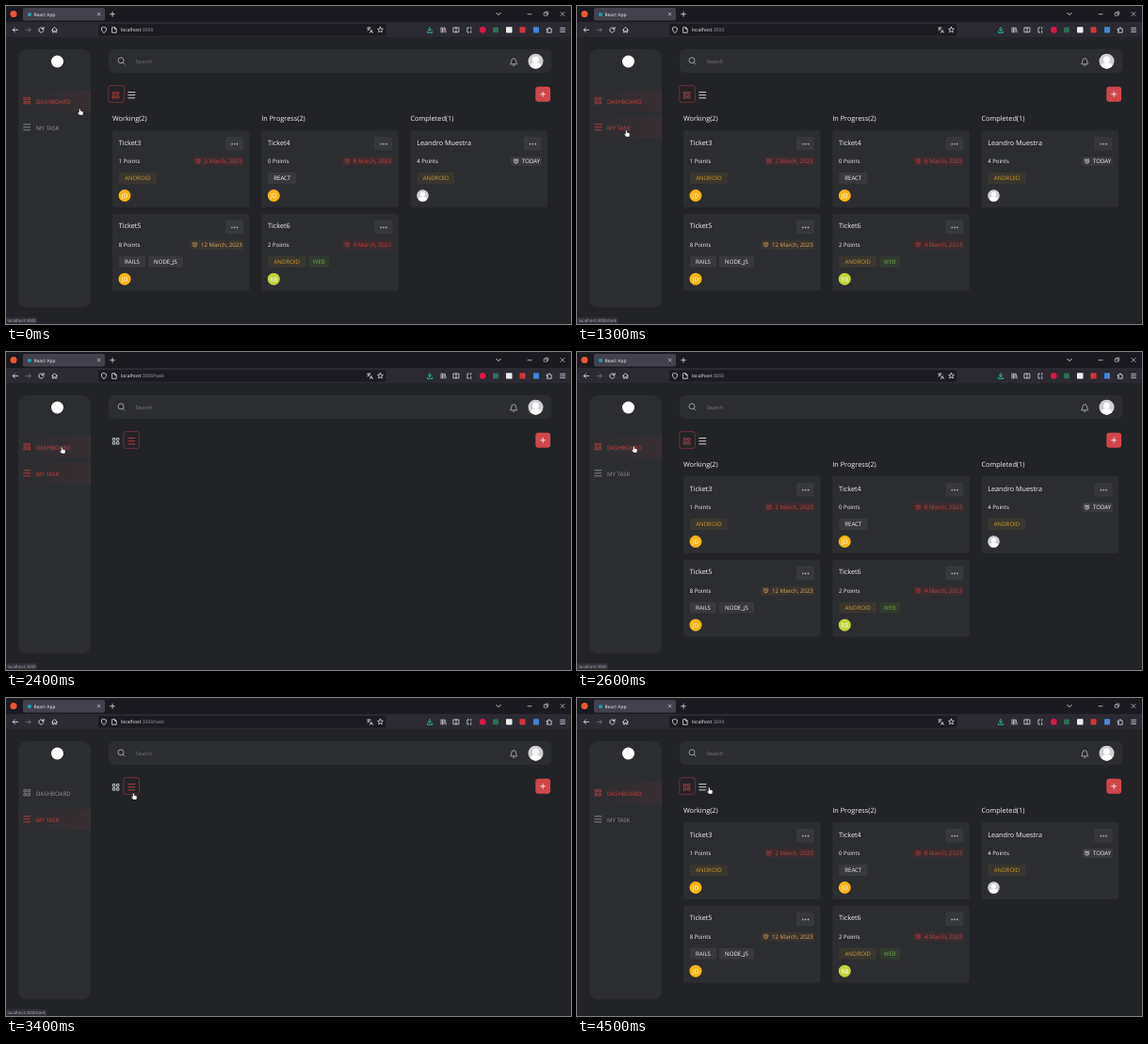
Animation, 600 px wide and 338 px high, one loop 4600 ms. Source, as an HTML page:

```html
<!DOCTYPE html>
<html lang="en">
<head>
<meta charset="utf-8">
<title>Task board</title>
<style>
  html, body { margin: 0; width: 100%; height: 100%; overflow: hidden; background: #222327; }
  svg { display: block; width: 100vw; height: 100vh; }
  text { font-family: "Open Sans", "Noto Sans", sans-serif; text-rendering: geometricPrecision; white-space: pre; }
</style>
</head>
<body>
<svg id="stage" viewBox="0 0 600 338"></svg>
<script>
const LOOP = 4600, STEP = 100;
const RED = '#c5423f', WHITE = '#f2f2f4', GREY = '#94959a', INK = '#dcdce0';

// Drawing helpers
const rect = (x, y, w, h, fill, r = 0, more = '') =>
  `<rect x="${x}" y="${y}" width="${w}" height="${h}" rx="${r}" fill="${fill}" ${more}/>`;
const circle = (x, y, r, fill) => `<circle cx="${x}" cy="${y}" r="${r}" fill="${fill}"/>`;
const line = (d, color = INK, w = 0.8) =>
  `<path d="${d}" fill="none" stroke="${color}" stroke-width="${w}" stroke-linecap="round" stroke-linejoin="round"/>`;
const text = (x, y, size, fill, value, more = '') =>
  `<text x="${x}" y="${y}" font-size="${size}" fill="${fill}" ${more}>${value}</text>`;
const group = (id, body) => `<g id="${id}">${body}</g>`;

const gridIcon = (x, y) => [[0, 0], [4.1, 0], [0, 4.1], [4.1, 4.1]].map(([dx, dy]) =>
  rect(x + dx, y + dy, 2.5, 2.5, 'none', 0.2, 'stroke="currentColor" stroke-width="0.8"')).join('');
const listIcon = (x, y, gap) =>
  line([0, 1, 2].map(i => `M${x} ${y + i * gap}h7`).join(''), 'currentColor', 0.85);

const person = (x, y, r) => circle(x, y, r, '#cfd0d2') +
  circle(x, y - r * 0.22, r * 0.42, '#fff') +
  `<path d="M${x - r * 0.7} ${y + r * 0.7}q0 ${-r * 0.5} ${r * 0.7} ${-r * 0.5}t${r * 0.7} ${r * 0.5}q${-r * 0.7} ${r * 0.6} ${-r * 1.4} 0" fill="#fff"/>`;

function browser() {
  return rect(0, 0, 600, 17, '#1b1a21') + rect(0, 17, 600, 16, '#2b2a33') +
    circle(8, 8.5, 3.5, '#ef5634') +
    rect(18, 2, 87, 13.5, '#42414d', 2) + circle(25, 9, 2.1, '#229caf') +
    text(29.5, 10.8, 4.9, WHITE, 'React App') +
    line('M97.2 7.2l2.8 2.8m0-2.8l-2.8 2.8', INK, 0.7) +
    line('M110.7 8.7h4.8m-2.4-2.4v4.8') +
    line('M520.7 7.3l2.3 2.3l2.3-2.3', INK, 0.9) +
    line('M554 8.7h4', INK, 0.7) +
    line('M571.6 7.2h3v3h-3zM572.8 7.2v-1.1h3v3h-1.1', INK, 0.6) +
    line('M589 6.5l4 4m0-4l-4 4', INK, 0.7) +
    line('M12.5 25.4h-5.3m2.2-2.2l-2.2 2.2l2.2 2.2', INK, 0.9) +
    line('M21 25.4h5.3m-2.2-2.2l2.2 2.2l-2.2 2.2', '#74737c') +
    line('M39.6 24a2.6 2.6 0 1 0 .4 2M40.1 22.5v2h-2', INK, 0.9) +
    line('M48.6 25.4l2.9-2.7l2.9 2.7m-5 -.4v3h1.5v-1.7h1.3v1.7h1.5v-3') +
    rect(98, 19, 305.5, 12.8, '#1c1b22', 2) +
    line('M104 22.5l2.5 1c0 2.5-.6 4-2.5 5c-1.9-1-2.5-2.5-2.5-5z') +
    line('M113 22.7h2.6l1.6 1.6v4h-4.2zM115.5 22.8v1.6h1.5') +
    `<text x="122" y="27.3" font-size="5.1" fill="#9c9ca4"><tspan fill="${WHITE}">localhost</tspan><tspan id="path"></tspan></text>` +
    line('M383.5 23.2h3.6m-1.8-.8v.8m1.2 0q-.7 2.3-2.7 2.8m.3-2q.8 1.5 2 1.8M386.6 28.4l1.4-3.2l1.4 3.2m-2.3-.9h1.8', INK, 0.65) +
    line('M397.5 22.3l.9 1.9l2 .2l-1.5 1.4l.4 2.1l-1.8-1.1l-1.8 1.1l.4-2.1l-1.5-1.4l2-.2z') +
    line('M450 22.5v3.8m-1.7-1.6l1.7 1.7l1.7-1.7m-4.2 2.4v1.2h5v-1.2', '#2bc3a5', 0.9) +
    line('M462 23v5m1.5-5v5m1.5-5v5m1-4.8l1.3 4.8') +
    line('M475.3 23h5.6v4.8h-5.6zM478 23v4.8') +
    line('M491.5 23h-1.6v5h1.6M493.7 22.5v1.7m0 2v2.3') +
    circle(506.3, 25.4, 3.3, '#df1748') +
    rect(517, 22.5, 6, 5.8, '#2f6d52', 1) +
    rect(531, 22.3, 6.5, 6.2, '#eeeeef', 0.7) +
    rect(545.5, 22.3, 6, 6.2, '#d2373a', 0.7) +
    rect(560, 22.3, 6, 6.2, '#4285d8', 0.7) +
    line('M574.5 24.2h1.6v-1.2h1.5v1.2h1.6v4h-4.7v-1.4h1v-1.3h-1z') +
    line('M588.7 23.3h4.8m-4.8 2.1h4.8m-4.8 2.1h4.8');
}

function navItem(id, label, y, icon) {
  return rect(13, y - 11, 77, 22, 'url(#glow)', 0, `id="${id}Glow"`) +
    group(id, icon + text(32, y + 2.5, 6.1, 'currentColor', label));
}

const toggleBox = (id, x, w) =>
  rect(x, 84.6, w, 17.8, 'none', 2.5, `id="${id}" stroke="#8f363a" stroke-width=".7"`);

function shell() {
  return rect(13, 46, 77, 274.5, '#2c2d30', 9) +
    circle(54.5, 59, 6.5, '#fff') +
    navItem('dash', 'DASHBOARD', 101, gridIcon(19, 97.3)) +
    navItem('task', 'MY TASK', 129, listIcon(18.8, 125.8, 3)) +
    rect(109, 46, 470.5, 25, '#2c2d30', 6) +
    `<circle cx="122" cy="57.8" r="3" fill="none" stroke="#a5a6aa" stroke-width=".9"/>` +
    line('M124.3 60.2l1.9 1.9', '#a5a6aa') +
    text(137.7, 61.3, 5.7, '#737478', 'Search') +
    line('M535.8 61.5q1-1 1-3.2q0-2.6 2.4-2.6t2.4 2.6q0 2.2 1 3.2zM538.3 63.1h1.8', '#b5b6ba') +
    person(562.5, 58.7, 8) +
    rect(562.3, 85.8, 15.8, 16, '#d0464a', 3) +
    line('M567.8 93.8h4.8m-2.4-2.4v4.8', '#fff') +
    toggleBox('gridBox', 108.8, 16.6) + toggleBox('listBox', 124.9, 16.6) +
    group('gridBtn', gridIcon(113.3, 91.5)) +
    group('listBtn', listIcon(129.8, 91.6, 3.1));
}

const tones = {
  red: ['#c2403f', '#3a2c2f'],
  amber: ['#e0a55c', '#383430'],
  gold: ['#c99a38', '#39362f'],
  green: ['#6ca64c', '#313a2f'],
  plain: [WHITE, '#38393c']
};

function dateChip(right, y, value, tone, width) {
  const [ink, back] = tones[tone], x = right - width;
  return rect(x, y - 5, width, 10, back, 2) +
    `<circle cx="${x + 5.5}" cy="${y + 0.2}" r="2" fill="none" stroke="${ink}" stroke-width=".7"/>` +
    line(`M${x + 5.5} ${y - 0.8}v1.2h.8M${x + 2.9} ${y - 1.6}l1.2-1.1M${x + 8.1} ${y - 1.6}l-1.2-1.1`, ink, 0.6) +
    text(right - 1.7, y + 2.2, 6.15, ink, value, 'text-anchor="end"');
}

function card(x, y, title, points, date, tone, chipWidth, tags, badge) {
  let tagX = x + 7;
  const tagMarkup = tags.map(([label, kind, width]) => {
    const [ink, back] = tones[kind];
    const out = rect(tagX, y + 45, width, 12, back, 2) +
      text(tagX + width / 2, y + 53.2, 6.1, ink, label, 'text-anchor="middle"');
    tagX += width + 3;
    return out;
  }).join('');
  const avatar = badge
    ? circle(x + 13, y + 69.5, 6.5, badge[1]) +
      text(x + 13, y + 71.8, 6.5, '#fff', badge[0], 'text-anchor="middle"')
    : person(x + 13, y + 69.5, 6.3);
  return rect(x, y, 145.5, 82, '#2c2d30', 2.5) +
    text(x + 6.7, y + 15.5, 7.25, WHITE, title) +
    rect(x + 120, y + 7, 19, 14.5, '#37383b', 2) +
    [0, 1, 2].map(i => circle(x + 127 + i * 2.8, y + 14.7, 0.85, '#b0b1b6')).join('') +
    text(x + 6.7, y + 35, 6.05, WHITE, points + ' Points') +
    dateChip(x + 139.5, y + 33, date, tone, chipWidth) + tagMarkup + avatar;
}

function board() {
  const cols = [113, 271.3, 429.5], rows = [132, 220.7];
  const jd = ['JD', '#fcb414'], rb = ['RB', '#c2d337'];
  const android = ['ANDROID', 'gold', 40];
  return ['Working(2)', 'In Progress(2)', 'Completed(1)']
      .map((label, i) => text(cols[i], 122, 7.3, WHITE, label)).join('') +
    card(cols[0], rows[0], 'Ticket3', 1, '2 March, 2023', 'red', 54, [android], jd) +
    card(cols[1], rows[0], 'Ticket4', 0, '8 March, 2023', 'red', 54, [['REACT', 'plain', 30]], jd) +
    card(cols[2], rows[0], 'Leandro Muestra', 4, 'TODAY', 'plain', 33, [android]) +
    card(cols[0], rows[1], 'Ticket5', 8, '12 March, 2023', 'amber', 57.5,
      [['RAILS', 'plain', 28], ['NODE_JS', 'plain', 37]], jd) +
    card(cols[1], rows[1], 'Ticket6', 2, '4 March, 2023', 'red', 54,
      [android, ['WEB', 'green', 22]], rb);
}

const hand = `<path d="M-1.2 -2.8q.8-.6 1.200 .2l.2 2l2 .5q1.100 .3 .9 1.500l-.5 2.600h-3.500l-2-2.500q.1-1 1.300-.2z" fill="#fff" stroke="#111" stroke-width=".4"/>`;
const arrow = `<path d="M-.8 -2.7v5l1.200-1l.7 1.600l.8-.4l-.7-1.500h1.500z" fill="#fff" stroke="#111" stroke-width=".3"/>`;

const stage = document.getElementById('stage');
stage.innerHTML =
  `<defs><linearGradient id="glow"><stop offset=".1" stop-color="#d0404c" stop-opacity="0"/>` +
  `<stop offset="1" stop-color="#d0404c" stop-opacity=".075"/></linearGradient></defs>` +
  rect(0, 0, 600, 338, '#222327') + browser() + shell() + group('board', board()) +
  group('status', rect(0, 330.7, 33, 8, '#303038', 0.8, 'id="statusBox"') +
    text(1.5, 336.3, 4.48, '#b9b9be', '', 'id="statusText"')) +
  group('cursor', group('hand', hand) + group('arrow', arrow));

const el = {};
stage.querySelectorAll('[id]').forEach(node => { el[node.id] = node; });
const show = (node, on) => node.setAttribute('visibility', on ? 'visible' : 'hidden');
const tint = (node, on, off) => node.setAttribute('color', on ? RED : off);

// Timelines: [ms, value...]
const pages = [[0, ''], [500, '/task'], [1000, ''], [1500, '/task'], [2600, ''], [3200, '/task'], [3600, '']];
const hints = [[0, ''], [400, '/task'], [900, ''], [1300, '/task'], [1600, null], [2300, ''],
  [2700, null], [3300, '/task'], [3500, null]];
const moves = [[0, 79, 112], [100, 76, 114], [400, 54, 134], [600, 53, 135], [900, 56, 106],
  [1100, 56, 107], [1300, 53, 135], [1500, 53, 137], [1800, 49, 176], [2000, 49, 174],
  [2400, 60, 104], [2600, 61, 103], [3100, 137, 94], [3200, 136, 99], [3400, 136, 104],
  [3500, 119, 100], [3700, 118, 99], [4200, 141, 98], [4600, 141, 98]];

const valueAt = (steps, t) => steps.filter(step => step[0] <= t).pop()[1];

function pointAt(t) {
  const i = moves.findIndex(move => move[0] > t);
  const [t0, x0, y0] = moves[i - 1], [t1, x1, y1] = moves[i];
  const k = (t - t0) / (t1 - t0);
  return [x0 + (x1 - x0) * k, y0 + (y1 - y0) * k];
}

function render(time) {
  const t = Math.floor((time % LOOP) / STEP) * STEP;
  const page = valueAt(pages, t), hint = valueAt(hints, t);
  const [x, y] = pointAt(t), tip = y - 3;
  const over = (x0, x1, y0, y1) => x >= x0 && x <= x1 && tip >= y0 && tip <= y1;
  const onDash = over(13, 90, 90, 112), onTask = over(13, 90, 118, 140);
  const onGrid = over(108, 124.9, 84, 103), onList = over(125, 140, 84, 103);
  const home = page === '';

  el.path.textContent = ':3000' + page;
  show(el.board, home);
  show(el.dashGlow, home || onDash);
  show(el.taskGlow, !home || onTask);
  tint(el.dash, home || onDash, GREY);
  tint(el.task, !home || onTask, GREY);
  show(el.gridBox, home || onGrid);
  show(el.listBox, !home || onList);
  tint(el.gridBtn, home || onGrid, WHITE);
  tint(el.listBtn, !home || onList, WHITE);

  show(el.status, hint !== null);
  el.statusText.textContent = 'localhost:3000' + (hint || '');
  el.statusBox.setAttribute('width', hint ? 43.5 : 33);

  const pointing = onDash || onTask || onGrid || over(125, 143, 84, 103);
  show(el.hand, pointing);
  show(el.arrow, !pointing);
  el.cursor.setAttribute('transform', `translate(${x} ${y})`);
}

const start = performance.now();
function tick() {
  render(performance.now() - start);
  requestAnimationFrame(tick);
}
tick();
</script>
</body>
</html>
```
